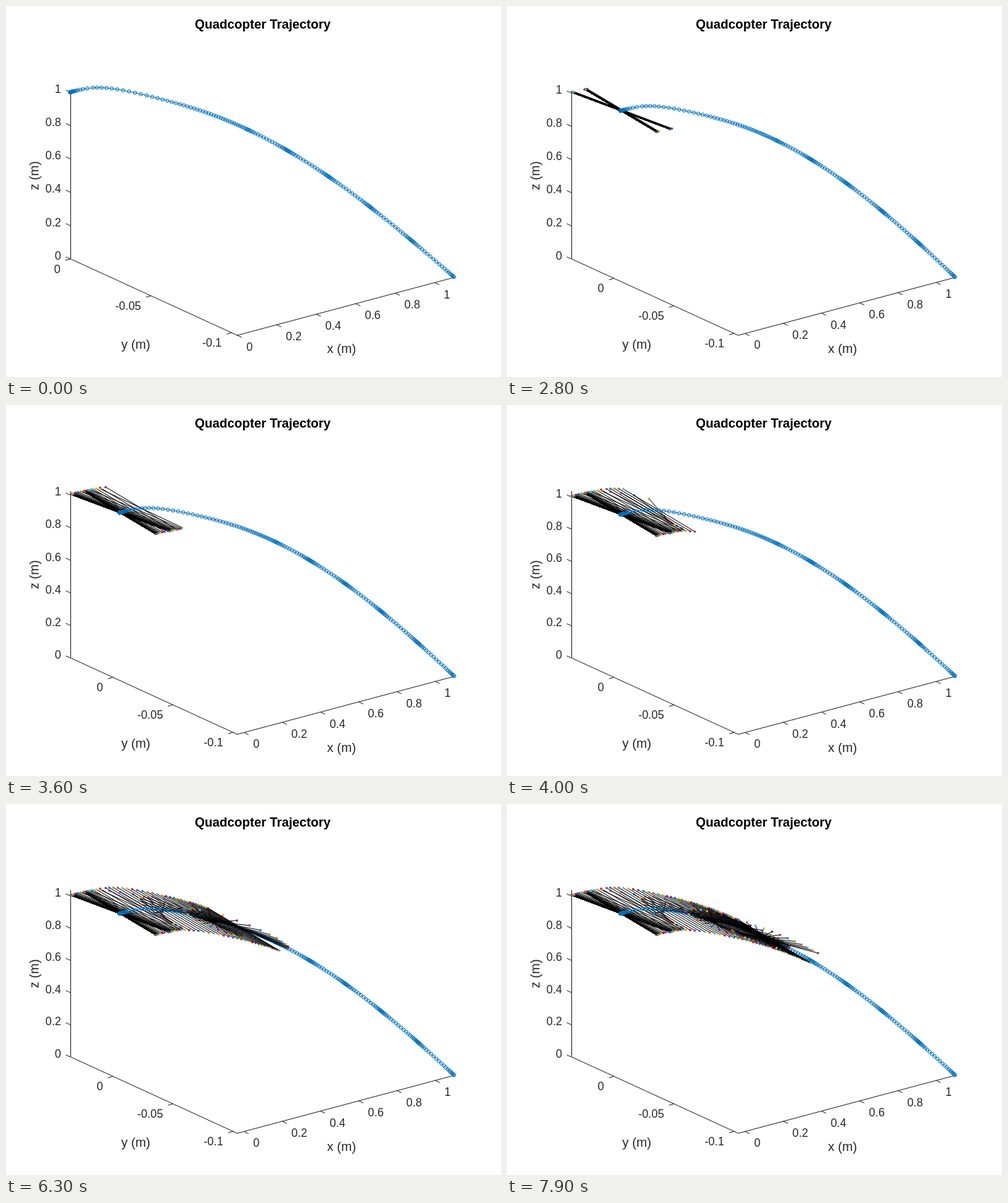
An HTML page that plays this animation: 700 by 525 pixels, repeating every 8 s.

```html
<!DOCTYPE html>
<html lang="en">
<head>
<meta charset="utf-8">
<title>Quadcopter Trajectory</title>
<style>
  html, body { margin: 0; width: 100%; height: 100%; overflow: hidden; background: #fff; }
  svg { display: block; font-family: "Liberation Sans", Arial, sans-serif; }
  text { fill: #262626; font-size: 18px; text-anchor: middle; }
  #labels text { font-size: 16px; }
  #labels .left { text-anchor: start; }
  #labels .right { text-anchor: end; }
  .title { fill: #000; font-weight: bold; }
  #axes { fill: none; stroke: #262626; stroke-width: 1; }
  #track { fill: none; stroke: #0072bd; stroke-width: 1; }
  .arm { fill: none; stroke: #000; stroke-width: 1; }
</style>
</head>
<body>
<svg width="700" height="525" viewBox="0 0 700 525">
  <path id="axes"/>
  <g id="labels"></g>
  <text class="title" x="363" y="32">Quadcopter Trajectory</text>
  <text x="474.5" y="491">x (m)</text>
  <text x="183.5" y="485">y (m)</text>
  <text transform="translate(45.5 240) rotate(-90)">z (m)</text>
  <g id="back"></g>
  <path id="track"/>
  <g id="front"></g>
</svg>
<script>
const FRAME = 100, FRAMES = 80, POINTS = 191;
const RANGE = 1.1, DRIFT = 0.1035, ARM = 0.05, HALF = ARM / Math.SQRT2;
const COLORS = ["#0072bd", "#d95319", "#edb120", "#7e2f8e", "#77ac30", "#4dbeee", "#a2142f"];
const el = id => document.getElementById(id);

// Samples start packed together, spread out, then settle into even clusters.
function sampleX(n) {
  const m = n - 36;
  if (m < 0) return .109 * Math.exp(m / 3.7);
  const cluster = Math.sin(2 * Math.PI * Math.max(0, m - 43) / 22.4);
  return Math.min(RANGE, .109 + .005 * m + .215 * Math.tanh(m / 19) - .011 * cluster);
}

// Flight path: near-parabolic fall with a sideways drift that sets in late.
function position(x) {
  const u = x / RANGE;
  const drift = DRIFT * Math.pow(u, 1.2) * (1 - Math.exp(-Math.pow(x / .22, 3)));
  return [x, -drift, 1 - u * u * (1 - .65 * (1 - u) ** 2)];
}

// The spin speeds up evenly, then keeps its rate.
function tumble(x) {
  const steady = Math.max(0, x - .26);
  return (6 + 2400 * (x * x - steady * steady)) * Math.PI / 180;
}

const track = Array.from({ length: POINTS }, (_, i) => position(sampleX(i + 1)));

// One arm stays level along the diagonal, the other turns around it.
const crosses = track.slice(0, FRAMES - 1).map(([x, y, z]) => {
  const a = tumble(x), c = HALF * Math.cos(a), up = ARM * Math.sin(a);
  return {
    top: z + Math.abs(up),
    ends: [[x - HALF, y - HALF, z], [x - c, y + c, z + up],
      [x + HALF, y + HALF, z], [x + c, y - c, z - up]]
  };
});

function projector(pad, zMax) {
  return ([x, y, z]) => {
    const u = (x + pad) / (RANGE + pad), v = (pad - y) / (pad + DRIFT);
    return [91 + 307 * u + 236 * v, 358 - 82 * u + 108 * v - 236 * z / zMax];
  };
}

const pt = p => p[0].toFixed(2) + " " + p[1].toFixed(2);

function drawAxes(project, pad) {
  let d = "M91.5 122V358L327 466L634 384", text = "";
  const tick = (p, dx, dy) => { d += `M${pt(p)}l${dx} ${dy}`; };
  const label = (cls, x, y, s) => {
    text += `<text class="${cls}" x="${x.toFixed(1)}" y="${y.toFixed(1)}">${s}</text>`;
  };
  for (let i = 0; i <= 5; i++) {
    const v = i / 5;
    const px = project([v, -DRIFT, 0]), pz = project([-pad, pad, v]);
    tick(px, 6.5, 3);
    label("left", px[0] + 13, px[1] + 22, v);
    tick(pz, -6.5, -3);
    label("right", 78, pz[1] + .8, v);
  }
  for (const v of [0, -.05, -.1]) {
    const p = project([-pad, v, 0]);
    tick(p, -7, 1.9);
    label("right", p[0] - 14, p[1] + 19.7, v);
  }
  el("axes").setAttribute("d", d);
  el("labels").innerHTML = text;
}

function drawTrack(project) {
  const pts = track.map(project);
  const ring = ([x, y]) => `M${pt([x - 2.4, y])}a2.4 2.4 0 1 0 4.8 0a2.4 2.4 0 1 0-4.8 0`;
  el("track").setAttribute("d", "M" + pts.map(pt).join("L") + pts.map(ring).join(""));
}

function crossMarkup(cross, i, project) {
  const p = cross.ends.map(project);
  const dots = p.map(([x, y], j) =>
    `<circle cx="${x.toFixed(2)}" cy="${y.toFixed(2)}" r="1.6" fill="${COLORS[(1 + 4 * i + j) % 7]}"/>`);
  return `<path class="arm" d="M${pt(p[0])}L${pt(p[2])}M${pt(p[1])}L${pt(p[3])}"/>` + dots.join("");
}

function draw(n) {
  const shown = crosses.slice(0, n);
  const pad = n ? HALF : 0;
  const project = projector(pad, Math.max(1, ...shown.map(c => c.top)));
  const marks = shown.map((c, i) => crossMarkup(c, i, project));
  drawAxes(project, pad);
  drawTrack(project);
  el("back").innerHTML = marks.slice(0, 47).join("");
  el("front").innerHTML = marks.slice(47).join("");
}

let last = -1;
const start = performance.now();
function loop() {
  const n = Math.floor((performance.now() - start) / FRAME) % FRAMES;
  if (n !== last) draw(last = n);
  requestAnimationFrame(loop);
}
loop();
</script>
</body>
</html>
```
